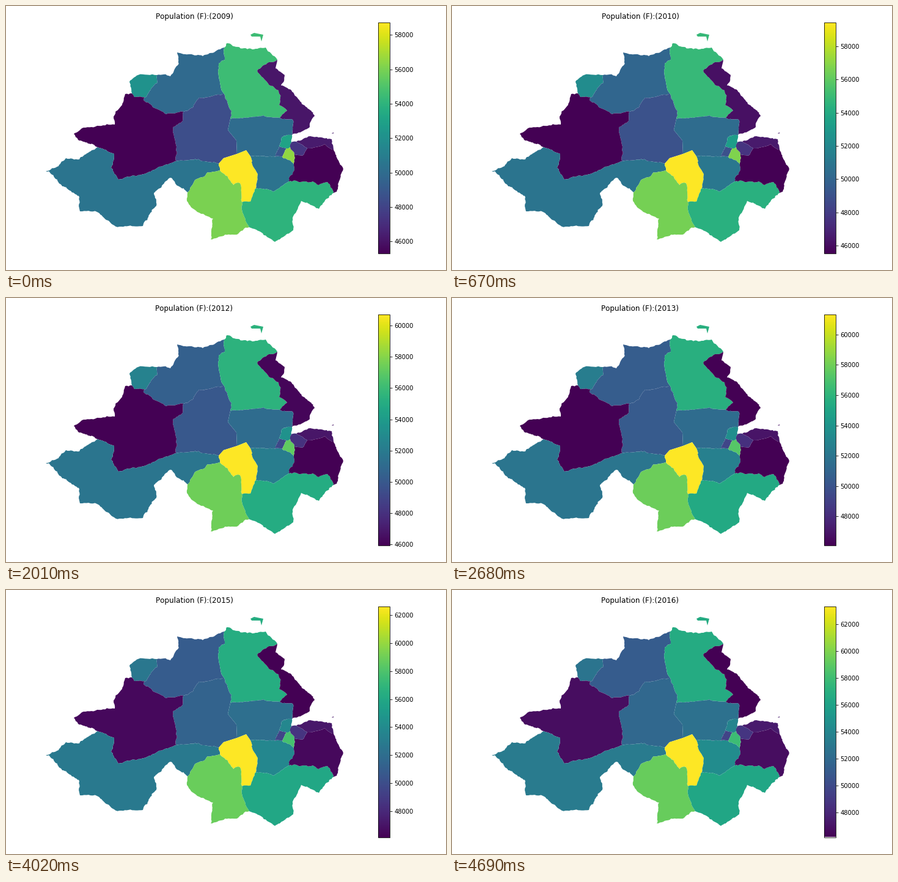
Write a matplotlib script that moves like this. It is 720 px wide and 432 px high and loops after 7370 ms.

```python
import numpy as np
import matplotlib.pyplot as plt
from matplotlib.animation import FuncAnimation
from matplotlib.collections import PolyCollection
from matplotlib.ticker import MultipleLocator

WIDTH, HEIGHT, DPI = 720, 432, 72
FIRST_YEAR, YEARS = 2009, 7
STEPS, INTERVAL = 11, 670

plt.rcParams["text.kerning_factor"] = 6
rng = np.random.default_rng(5)

# Points where borders meet, each known by one letter
nodes = dict(
    a=(206, 143), b=(227, 150), c=(247, 113), d=(357, 68), e=(357, 144), f=(290, 173),
    g=(278, 254), h=(150, 231), i=(348, 258), j=(350, 269), k=(297, 305), l=(378, 242),
    m=(367, 185), n=(400, 246), o=(409, 298), p=(386, 321), q=(398, 362), r=(463, 287),
    s=(536, 306), t=(444, 88), u=(448, 183), v=(468, 211), w=(447, 230), x=(440, 247),
    y=(452, 247), z=(459, 233), A=(467, 223), B=(465, 231), C=(472, 243), D=(471, 259),
    E=(493, 233), F=(475, 222), G=(536, 235))

# Key points passed on the way from one node to another
coasts = dict(
    ac=[202, 124, 216, 113],
    cd=[269, 115, 281, 97, 280, 76, 322, 82],
    dt=[361, 61, 403, 71, 425, 68],
    tv=[441, 102, 456, 113, 450, 130, 467, 138, 480, 154, 494, 168, 505, 180, 497, 198],
    FG=[498, 213, 533, 218],
    Gs=[551, 264, 541, 304],
    sq=[512, 332, 483, 319, 470, 344, 470, 367, 440, 386],
    qk=[378, 374, 335, 382, 339, 348, 313, 337, 296, 319],
    kh=[270, 281, 255, 294, 242, 306, 246, 327, 224, 360, 177, 359, 149, 337, 121, 336,
        120, 313, 92, 295, 65, 270, 86, 262, 98, 249, 120, 251],
    ha=[118, 219, 111, 209, 127, 199, 178, 194, 176, 181, 190, 162, 195, 144])
borders = dict(
    ab=[210, 149], bc=[235, 139, 248, 126], bf=[225, 154, 262, 177],
    fe=[306, 166, 316, 150], ed=[348, 115, 348, 94, 358, 88], em=[369, 172],
    fg=[289, 188, 273, 199, 279, 230], gh=[231, 273, 184, 284, 172, 265, 177, 242],
    gi=[317, 252], tu=[430, 92, 411, 106, 446, 138, 447, 162, 460, 171], mu=[421, 179],
    uv=[469, 186], jk=[330, 272, 309, 285], jp=[372, 293, 383, 290],
    no=[404, 262, 412, 275], op=[400, 320], pq=[388, 340], rs=[502, 287, 511, 293, 526, 288],
    rD=[472, 268], vw=[451, 215], EG=[521, 226], CE=[485, 245])
borders["or"] = [437, 304]
lake_shore = dict(il=[356, 249], lm=[377, 220, 363, 203], ln=[393, 236])
routes = coasts | borders | lake_shore

# Outline as a round of nodes, value in the first year, value in the last year
regions = [
    ("abc", 52150, 52750), ("cdefb", 49900, 51050), ("dtume", 54500, 56650),
    ("tvu", 46080, 46140), ("emligf", 48500, 51850), ("abfgh", 45370, 46720),
    ("khgij", 50450, 53200), ("muvwxnl", 50000, 52500), ("lnopji", 58710, 63322),
    ("kjpq", 56030, 59350), ("nxyDro", 50400, 54400), ("orsqp", 54000, 56300),
    ("rsGECD", 45325, 46700), ("FGE", 46300, 47350), ("vABzw", 53100, 53900),
    ("wzyx", 48850, 49600), ("zBCDy", 56500, 57950), ("AFECB", 47400, 48800),
]
islands = {"dtume": [400, 47, 406, 44, 421, 47, 418, 58, 416, 50, 402, 50],
           "FGE": [533, 209, 535, 207, 537, 208]}


def roughen(a, b):
    """Points from a up to b, split at shifted midpoints down to short steps."""
    dx, dy = b - a
    length = np.hypot(dx, dy)
    if length < 4:
        return [a]
    shift = rng.normal(0, 0.22 / np.sqrt(length))
    mid = (a + b) / 2 + shift * np.array([-dy, dx])
    return roughen(a, mid) + roughen(mid, b)


def trace(key):
    start, end = nodes[key[0]], nodes[key[1]]
    pts = np.array([*start, *routes.get(key, []), *end], float).reshape(-1, 2)
    if key in lake_shore:
        return pts
    return np.array([p for a, b in zip(pts, pts[1:]) for p in roughen(a, b)] + [pts[-1]])


lines = {}


def line(key):
    """Line between two nodes; neighbours share it, in either direction."""
    back = key[::-1]
    if back in routes or back in lines:
        return line(back)[::-1]
    if key not in lines:
        lines[key] = trace(key)
    return lines[key]


def ring(names):
    return np.concatenate([line(a + b) for a, b in zip(names, names[1:] + names[0])])


outlines, start, end = [], [], []
for names, first, last in regions:
    shapes_here = [ring(names)]
    if names in islands:
        shapes_here.append(np.reshape(islands[names], (-1, 2)))
    for shape in shapes_here:
        outlines.append(shape)
        start.append(first)
        end.append(last)
start, end = np.array(start), np.array(end)

fig = plt.figure(figsize=(WIDTH / DPI, HEIGHT / DPI), dpi=DPI, facecolor="white")
ax = fig.add_axes([0, 0, 1, 1])
ax.set(xlim=(0, WIDTH), ylim=(HEIGHT, 0))
ax.axis("off")
shapes = PolyCollection(outlines, cmap="viridis", linewidths=0, edgecolors="none")
shapes.set_array(start)
ax.add_collection(shapes)
title = ax.text(308, 21, "", fontsize=12, ha="center", va="baseline")

cax = fig.add_axes([609.4 / WIDTH, 1 - 404.5 / HEIGHT, 18.85 / WIDTH, 377.3 / HEIGHT])
fig.colorbar(shapes, cax=cax, ticks=MultipleLocator(2000), format="%d")


def draw(i):
    year = min(i, YEARS)
    # Growth is a little slower around the middle years
    growth = year / YEARS + 0.015 * np.sin(2 * np.pi * year / YEARS)
    values = start + (end - start) * growth
    shapes.set_array(values)
    shapes.set_clim(values.min(), values.max())
    title.set_text(f"Population (F):({FIRST_YEAR + year})")
    return shapes, title


anim = FuncAnimation(fig, draw, frames=STEPS, interval=INTERVAL, init_func=lambda: draw(0),
                     repeat=True, repeat_delay=0, blit=False)
plt.show()
```
